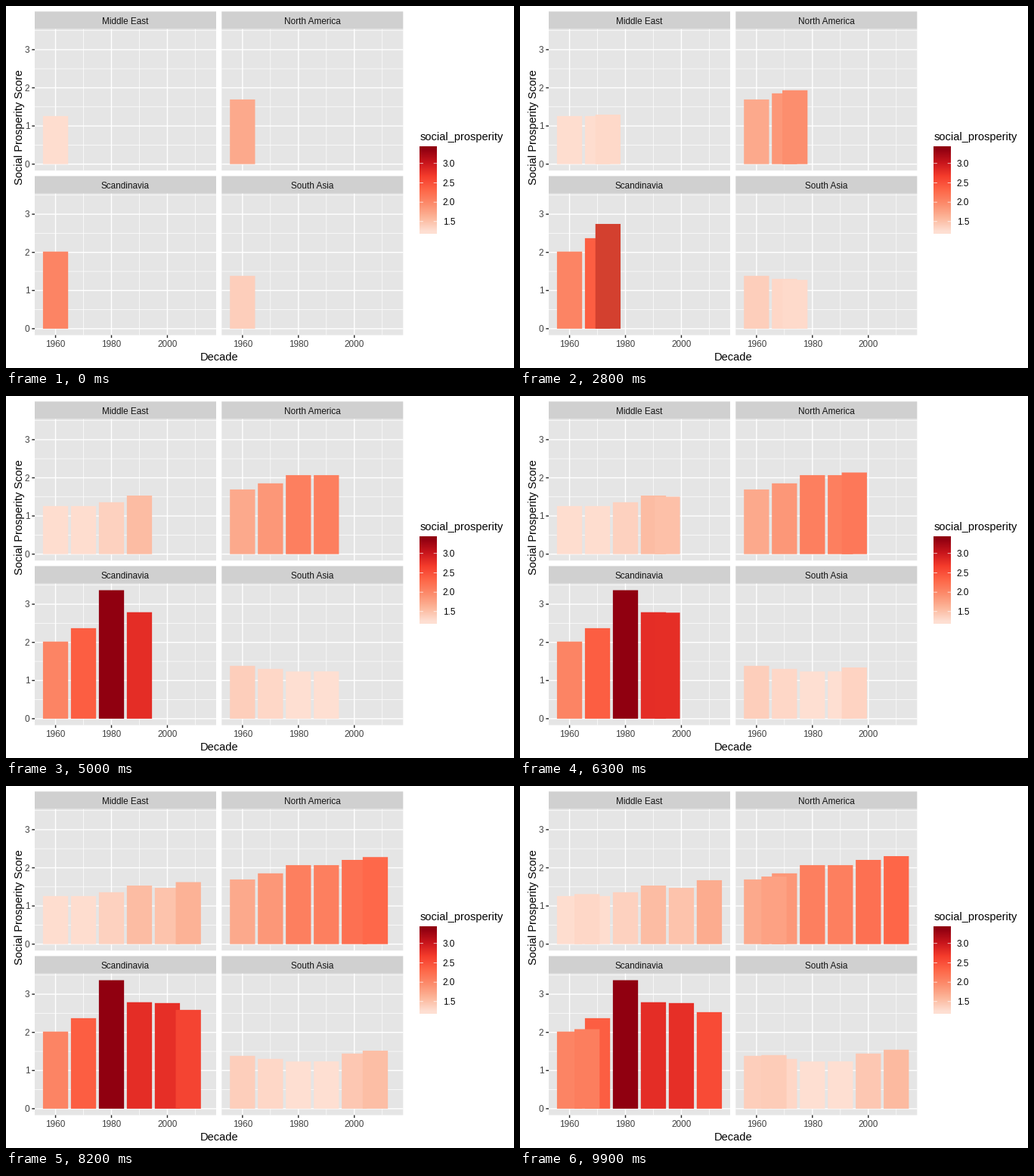
These frames come from a looping animation (672x480 px, 10000 ms). A matplotlib script:

```python
import numpy as np
import matplotlib.pyplot as plt
from matplotlib.animation import FuncAnimation
from matplotlib.colors import LinearSegmentedColormap
from matplotlib.patches import Rectangle

plt.rcParams["font.family"] = "Liberation Sans"

WIDTH, HEIGHT, DPI = 672, 480, 96
FRAMES, INTERVAL = 100, 100
STARTS = [9, 26, 43, 60, 77, 93]
STEPS = 8

DECADES = np.arange(1960, 2011, 10)
REGIONS = {
    "Middle East": [1.26, 1.26, 1.36, 1.535, 1.475, 1.675],
    "North America": [1.695, 1.855, 2.07, 2.07, 2.207, 2.306],
    "Scandinavia": [2.02, 2.372, 3.367, 2.79, 2.768, 2.53],
    "South Asia": [1.385, 1.305, 1.237, 1.24, 1.445, 1.545],
}
LOW, HIGH = 1.237, 3.367

PANEL_W, PANEL_H, STRIP_H = 240, 187.6, 23.3
LEFTS, TOPS = (38, 285.3), (30.6, 248.8)
YEAR_PX, UNIT_PX = PANEL_W / 64.9, 50.6
FIRST_YEAR, BASE = 1952.55, 0.1685
BAR_W = 9 * YEAR_PX
MAJOR, MINOR = 1.067, 0.533

REDS = LinearSegmentedColormap.from_list("reds", [
    "#FEDFD2", "#FCB599", "#FC8C6C", "#FE6648", "#F53C2C", "#C8151C", "#900010"])

TO_XYZ = np.array([[0.4124, 0.3576, 0.1805],
                   [0.2126, 0.7152, 0.0722],
                   [0.0193, 0.1192, 0.9505]])
WHITE = TO_XYZ.sum(axis=1)
TO_LAB = np.array([[0, 116, 0], [500, -500, 0], [0, 200, -200]])


def fill(value):
    return np.array(REDS((value - LOW) / (HIGH - LOW))[:3])


def rgb_to_lab(rgb):
    linear = np.where(rgb > 0.04045, ((rgb + 0.055) / 1.055) ** 2.4, rgb / 12.92)
    xyz = TO_XYZ @ linear / WHITE
    return TO_LAB @ np.where(xyz > 0.008856, np.cbrt(xyz), 7.787 * xyz + 16 / 116)


def lab_to_rgb(lab):
    root = np.linalg.solve(TO_LAB, lab)
    xyz = np.where(root > 0.2069, root ** 3, (root - 16 / 116) / 7.787) * WHITE
    linear = np.clip(np.linalg.solve(TO_XYZ, xyz), 0, 1)
    return np.where(linear > 0.0031308,
                    1.055 * linear ** (1 / 2.4) - 0.055, 12.92 * linear)


def mix_colors(a, b, t):
    return np.clip(lab_to_rgb((1 - t) * rgb_to_lab(a) + t * rgb_to_lab(b)), 0, 1)


fig = plt.figure(figsize=(WIDTH / DPI, HEIGHT / DPI), dpi=DPI, facecolor="white")
ax = fig.add_axes([0, 0, 1, 1])


def rect(x, y, w, h, color, z=1):
    patch = Rectangle((x, y), w, h, facecolor=color, linewidth=0, zorder=z, snap=False)
    return ax.add_patch(patch)


def line(x0, y0, x1, y1, color, width, z=2):
    ax.plot([x0, x1], [y0, y1], color=color, lw=width, zorder=z,
            solid_capstyle="butt", snap=False)


def label(x, y, text, size=8.8, color="black", ha="center", **kw):
    ax.text(x, y, text, fontsize=size, color=color, ha=ha, va="baseline", **kw)


def year_x(left, year):
    return left + (year - FIRST_YEAR) * YEAR_PX


def value_y(top, value):
    return top + PANEL_H - (value + BASE) * UNIT_PX


def draw_panel(left, top, title):
    right, bottom = left + PANEL_W, top + PANEL_H
    rect(left, top - STRIP_H, PANEL_W, STRIP_H, "#D0D0D0")
    label(left + PANEL_W / 2, top - 6.5, title, color="#141414")
    rect(left, top, PANEL_W, PANEL_H, "#E5E5E5")
    for value in np.arange(0, 3.6, 0.5):
        y = value_y(top, value)
        line(left, y, right, y, "white", MINOR if value % 1 else MAJOR)
    for year in DECADES:
        x = year_x(left, year)
        line(x, top, x, bottom, "white", MINOR if year % 20 else MAJOR)


def draw_axes():
    for top in TOPS:
        for value in range(4):
            y = value_y(top, value)
            line(LEFTS[0] - 3.67, y, LEFTS[0], y, "#2A2A2A", MAJOR)
            label(31.4, y + 4.2, str(value), color="#404040", ha="right")
    bottom = TOPS[1] + PANEL_H
    for left in LEFTS:
        for year in (1960, 1980, 2000):
            x = year_x(left, year)
            line(x, bottom, x, bottom + 3.67, "#2A2A2A", MAJOR)
            label(x, 452, str(year), color="#404040")
    label(281.6, 470, "Decade", 11)
    label(18, 233.8, "Social Prosperity Score", 11, rotation=90)


def draw_legend():
    x, y, w, h = 547.3, 187, 23, 115.2
    pad = h / 40
    label(x, 178, "social_prosperity", 11, ha="left")
    ramp = np.clip((np.linspace(h, 0, 231) - pad) / (h - 2 * pad), 0, 1)
    ax.imshow(REDS(ramp)[:, None, :3], extent=(x, x + w, y + h, y),
              aspect="auto", zorder=1)
    for value in (1.5, 2.0, 2.5, 3.0):
        ty = y + h - pad - (value - LOW) / (HIGH - LOW) * (h - 2 * pad)
        line(x, ty, x + w / 5, ty, "white", MINOR)
        line(x + w * 0.8, ty, x + w, ty, "white", MINOR)
        label(577.7, ty + 4.2, f"{value:.1f}", ha="left")


def place_bar(bar, left, top, year, value, color):
    y = value_y(top, value)
    bar.set_bounds(year_x(left, year) - BAR_W / 2, y, BAR_W, value_y(top, 0) - y)
    bar.set_facecolor(color)


panels = []
for i, (region, values) in enumerate(REGIONS.items()):
    left, top = LEFTS[i % 2], TOPS[i // 2]
    draw_panel(left, top, region)
    marks = [rect(0, 0, 0, 0, "white", 3) for _ in DECADES]
    for mark, year, value in zip(marks, DECADES, values):
        place_bar(mark, left, top, year, value, fill(value))
    panels.append((left, top, values, marks, rect(0, 0, 0, 0, "white", 4)))
draw_axes()
draw_legend()
ax.set(xlim=(0, WIDTH), ylim=(HEIGHT, 0))
ax.axis("off")


def update(frame):
    passed = sum(start <= frame for start in STARTS)
    source, goal = max(passed - 1, 0), passed % len(DECADES)
    t = min((frame - STARTS[source] + 1) / STEPS, 1) if passed else 0
    year = (1 - t) * DECADES[source] + t * DECADES[goal]
    for left, top, values, marks, mover in panels:
        for i, mark in enumerate(marks):
            mark.set_visible(i < passed)
        a, b = values[source], values[goal]
        place_bar(mover, left, top, year, (1 - t) * a + t * b,
                  mix_colors(fill(a), fill(b), t))
    return []


anim = FuncAnimation(fig, update, frames=FRAMES, interval=INTERVAL,
                     repeat=True, repeat_delay=0, blit=False)
plt.show()
```
